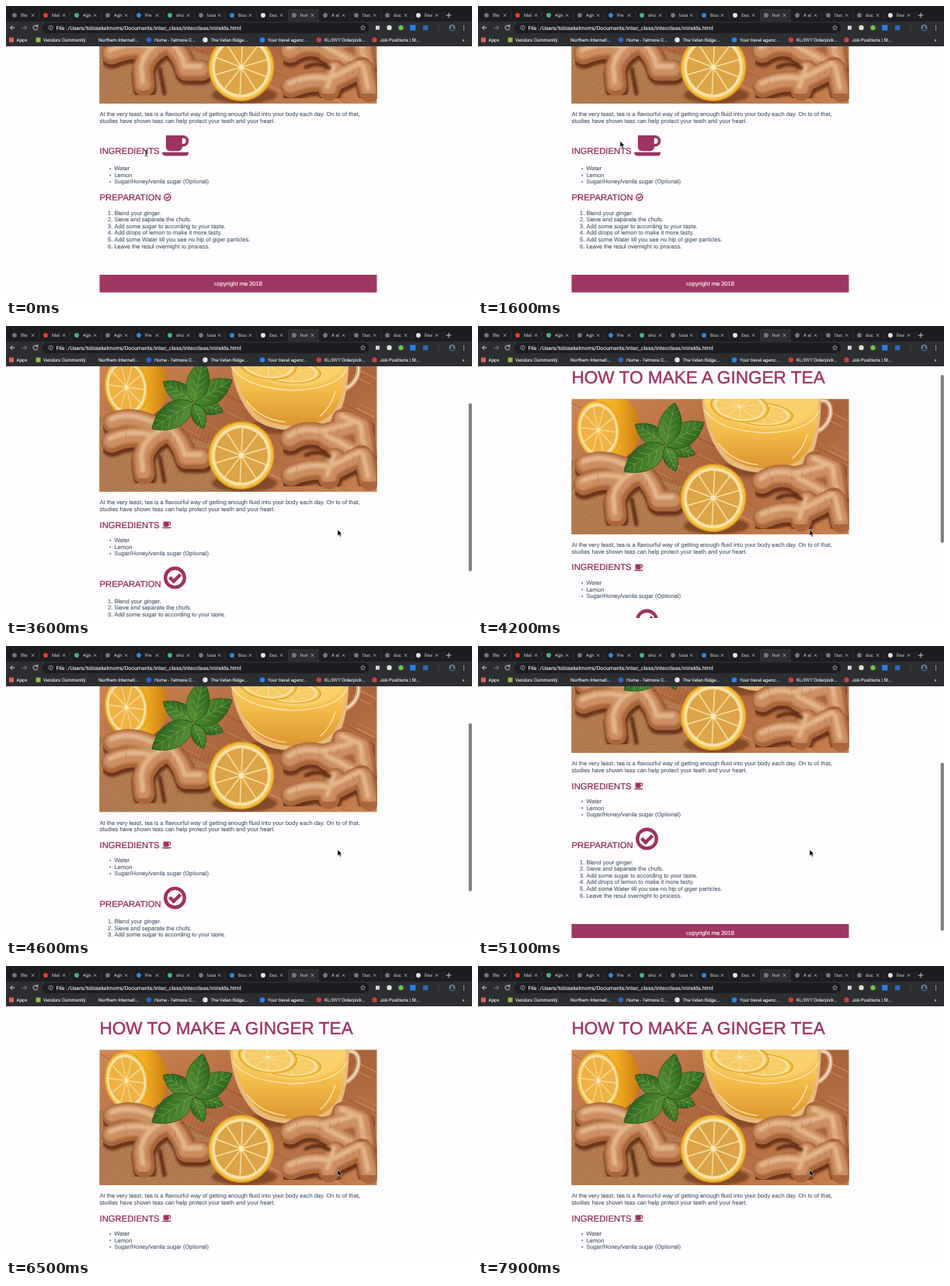
Write an HTML page that moves like this. It is 600 by 377 pixels and loops after 8000 ms.

```html
<!DOCTYPE html>
<html lang="en">
<head>
<meta charset="utf-8">
<title>Ginger tea</title>
<style>
  html, body { margin: 0; width: 100%; height: 100%; overflow: hidden; background: #fffdff; }
  svg { display: block; width: 600px; height: 377px; }
  text { text-rendering: geometricPrecision; white-space: pre; }
  .page text { font: 7.53px "Liberation Sans", Arial, sans-serif; fill: #4c5c6d; stroke: #4c5c6d; stroke-width: .12; }
  .page .h1 { font-size: 22.59px; fill: #9c3361; stroke: #9c3361; stroke-width: .4; }
  .page .h3 { font-size: 11.29px; fill: #8c2250; stroke: #8c2250; stroke-width: .2; }
  .page .foot { fill: #fff; stroke: #fff; text-anchor: middle; }
  .chrome text { font: 6px Roboto, sans-serif; fill: #eceef0; stroke: #eceef0; stroke-width: .12; }
  .chrome .tab { fill: #b4b7bc; stroke: #b4b7bc; }
  .chrome .url { font-size: 7px; }
  .line { fill: none; stroke-linecap: round; stroke-linejoin: round; }
</style>
</head>
<body>
<svg viewBox="0 0 600 377">
  <defs>
    <clipPath id="photoClip"><rect x="120.5" y="108.3" width="357" height="174.7"/></clipPath>
    <filter id="soft"><feGaussianBlur stdDeviation="1.8"/></filter>
    <linearGradient id="wood" x2="1" y2="1">
      <stop stop-color="#cf8856"/><stop offset=".5" stop-color="#a9633b"/><stop offset="1" stop-color="#c88253"/>
    </linearGradient>
    <linearGradient id="tea" x2="0" y2="1">
      <stop stop-color="#f8d66d"/><stop offset=".55" stop-color="#f1b744"/><stop offset="1" stop-color="#d9942f"/>
    </linearGradient>
    <linearGradient id="peel">
      <stop stop-color="#f6c33c"/><stop offset=".6" stop-color="#f2ad22"/><stop offset="1" stop-color="#c97a12"/>
    </linearGradient>
    <linearGradient id="leaf" x2="1" y2="1">
      <stop stop-color="#5f9a3a"/><stop offset="1" stop-color="#23591b"/>
    </linearGradient>
  </defs>
  <rect width="600" height="377" fill="#fffdff"/>
  <g class="page" id="page">
    <text class="h1" x="120.5" y="88">HOW TO MAKE A GINGER TEA</text>
    <g id="photo" clip-path="url(#photoClip)"></g>
    <text x="120.5" y="299.4">At the very least, tea is a flavourful way of getting enough fluid into your body each day. On to of that,</text>
    <text x="120.5" y="308">studies have shown teas can help protect your teeth and your heart.</text>
    <g id="ingredients">
      <text class="h3" x="120.5">INGREDIENTS</text>
      <g id="cup" fill="#9c3361">
        <path fill-rule="evenodd" d="M4.9-24.2H27a7.3 7.3 0 0 1 0 14.6h-1.2v.6a5 5 0 0 1-5 5H9.9a5 5 0 0 1-5-5zM25.8-20.6v7.3H27a3.6 3.6 0 0 0 0-7.3z"/>
        <path d="M0-2.4H34.3a4.8 4.8 0 0 1-4.8 4.8H4.8A4.8 4.8 0 0 1 0-2.4z"/>
      </g>
    </g>
    <g id="bullets"></g>
    <g id="preparation">
      <text class="h3" x="120.5">PREPARATION</text>
      <g id="check" class="line" stroke="#9c3361" stroke-width="4.4">
        <circle cx="14.5" cy="-12" r="12.3"/>
        <path stroke-linecap="butt" stroke-linejoin="miter" d="M7.6-12.6l5.2 5.2 8.9-8.9"/>
      </g>
    </g>
    <g id="steps"></g>
    <g id="footer">
      <rect x="120.5" width="357" height="22.8" fill="#9f3763"/>
      <text class="foot" x="299" y="13.6">copyright me 2018</text>
    </g>
  </g>
  <rect id="thumb" x="595.8" width="4" height="217" rx="2" fill="#7d7d7f"/>
  <g class="chrome" id="chrome"></g>
  <g id="cursor">
    <path id="arrow" d="M0 0v8l1.9-1.7 1.3 2.9 1.4-.6-1.3-2.8h2.5z" fill="#000" stroke="#fff" stroke-width=".5"/>
    <path id="beam" class="line" d="M-1.6-4Q0-4 0-2.6V2.6Q0 4-1.6 4M1.6-4Q0-4 0-2.6M0 2.6Q0 4 1.6 4M-1 1h2" stroke="#222" stroke-width=".8"/>
  </g>
</svg>
<script>
const el = id => document.getElementById(id);
const text = (x, y, label, cls = '') => `<text x="${x}" y="${y}" class="${cls}">${label}</text>`;
const rect = (x, y, w, h, fill, rx = 0) => `<rect x="${x}" y="${y}" width="${w}" height="${h}" fill="${fill}" rx="${rx}"/>`;
const dot = (x, y, r, fill) => `<circle cx="${x}" cy="${y}" r="${r}" fill="${fill}"/>`;
const line = (d, stroke, width = 1) => `<path class="line" d="${d}" stroke="${stroke}" stroke-width="${width}"/>`;
const blur = shapes => `<g filter="url(#soft)">${shapes}</g>`;

let seed = 11;
const random = () => (seed = seed * 16807 % 2147483647) / 2147483647;

function lemon(x, y, rx, ry, tilt, flesh) {
  let s = dot(0, 0, 1, '#dc9a22') + dot(0, 0, .96, '#f3c145') + dot(0, 0, .89, '#f7e2a6') + dot(0, 0, .8, flesh);
  for (let i = 0; i < 10; i++) {
    const a = i * Math.PI / 5 + .2;
    s += line(`M0 0L${Math.cos(a) * .8} ${Math.sin(a) * .8}`, '#f6dc97', .04);
  }
  return `<g transform="translate(${x} ${y}) rotate(${tilt}) scale(${rx} ${ry})">${s}${dot(0, 0, .08, '#f9e7b8')}</g>`;
}

function ginger(fingers, width) {
  const layer = (dx, dy, color, w) =>
    `<g transform="translate(${dx} ${dy})">${fingers.map(d => line(d, color, w)).join('')}</g>`;
  return blur(layer(1, 4, '#6a361b', width + 3)) + layer(0, 0, '#a9663c', width) +
    blur(layer(-1, -2, '#cb8f62', width * .7) + layer(-2, -5, '#e3b68c', width * .22));
}

function leaf(x, y, length, angle) {
  const w = length * .32;
  let veins = `M0 0H${length * .95}`;
  for (let i = 1; i < 5; i++) {
    const p = length * i * .18;
    veins += `M${p} 0l${w * .5} ${-w * .5}M${p} 0l${w * .5} ${w * .5}`;
  }
  return `<g transform="translate(${x} ${y}) rotate(${angle})">
    <path d="M0 0C${length * .2} ${-w * 1.2} ${length * .7} ${-w} ${length} 0C${length * .7} ${w} ${length * .2} ${w * 1.2} 0 0" fill="url(#leaf)" stroke="#1f4f19" stroke-width=".7"/>
    ${line(veins, '#83b25a', .5)}</g>`;
}

function drawPhoto() {
  let s = rect(120, 108, 358, 176, 'url(#wood)');
  for (let i = 0; i < 60; i++) {
    const x = 110 + random() * 370, y = 108 + random() * 170, n = 15 + random() * 50;
    s += line(`M${x} ${y}l${n} ${n * .5}`, random() < .5 ? '#8e482799' : '#dba06e99', .4 + random());
  }
  s += '<path d="M120 186L190 196 262 222 290 283H120z" fill="#ad764c"/>';
  for (let i = 0; i < 34; i++) s += line(`M${120 + i * 5} 192l-30 90M120 ${194 + i * 4}l150 30`, '#c99a6d66', .7);

  s += blur('<ellipse cx="178" cy="186" rx="36" ry="9" fill="#6f371c99"/>');
  s += '<ellipse cx="171" cy="146" rx="38" ry="43" fill="url(#peel)"/>' + lemon(155, 148, 28, 38, -8, '#efb344');

  // glass cup, slices and handle
  s += blur('<ellipse cx="374" cy="199" rx="66" ry="10" fill="#6f371c99"/>');
  s += line('M436 111C460 102 460 142 435 151', '#d3a580', 6) + line('M437 111C460 103 460 141 436 150', '#f3e0cd', 2);
  s += '<path d="M288 104Q291 157 318 187Q334 203 372 204Q413 204 428 183Q441 162 442 104z" fill="#e8bb7c"/>';
  s += '<path d="M291 108Q296 153 321 181Q337 197 372 198Q407 198 423 178Q437 156 438 108z" fill="url(#tea)"/>';
  s += blur('<path d="M294 108H436Q434 143 380 147Q318 147 294 108z" fill="#f8d16a"/>');
  s += lemon(366, 128, 40, 15, 4, '#f6cb62') + lemon(337, 118, 38, 20, 8, '#f6cb62');
  s += line('M291 122Q308 149 370 152Q427 150 439 124', '#fbe7b0', 1.3);
  s += line('M310 166Q328 190 360 193', '#f8dc98', 1.4) + line('M424 154Q418 174 405 185', '#fbe4b0', 1.4);

  s += ginger(['M138 194Q160 184 188 197L214 206', 'M136 219Q160 208 186 214', 'M204 207Q180 218 176 240L178 260', 'M214 208Q228 222 232 240L252 240'], 27);
  s += ginger(['M366 216Q384 203 408 210L446 200', 'M434 190L458 200 464 236', 'M414 215L446 232'], 29);
  s += ginger(['M367 262Q392 250 418 256L458 236', 'M462 240L468 268', 'M424 240L416 266'], 27);
  s += blur(line('M386 236Q402 228 416 237', '#5f2f18', 5) + line('M198 238L204 270', '#5f2f18', 5));
  for (let i = 0; i < 26; i++) {
    const right = i > 11, x = right ? 365 + random() * 95 : 143 + random() * 80, y = 198 + random() * 58;
    s += line(`M${x} ${y}q4 4 ${2 - random() * 4} 9`, '#8a512f66', .8);
  }

  s += leaf(242, 166, 40, 20) + leaf(242, 168, 57, -31) + leaf(241, 166, 46, -147);
  s += leaf(240, 168, 62, 147) + leaf(242, 167, 55, -78) + leaf(242, 170, 34, 68);
  s += blur('<ellipse cx="307" cy="272" rx="42" ry="11" fill="#5f2d1799"/>') + lemon(303, 236, 42.5, 44, 9, '#dba548');
  el('photo').innerHTML = s;
}

function drawLists() {
  el('bullets').innerHTML = ['Water', 'Lemon', 'Sugar/Honey/vanila sugar (Optional)']
    .map((item, i) => dot(134.2, i * 8.6 - 2.3, .95, '#4c5c6d') + text(139.4, i * 8.6, item)).join('');
  el('steps').innerHTML = ['Blend your ginger.', 'Sieve and separate the chufs.', 'Add some sugar to according to your taste.',
    'Add drops of lemon to make it more tasty.', 'Add some Water till you see no hip of giger particles.', 'Leave the resul overnight to process.']
    .map((item, i) => text(131, i * 8.55, i + 1 + '.') + text(139.4, i * 8.55, item)).join('');
}

function drawChrome() {
  const tabs = ['file:', 'Mai', 'Agn', 'Agn', 'Fre', 'sho', 'loca', 'Boo', 'Doc', 'hov', 'A si', 'Doc', 'doc', 'Res'];
  const tabColors = { 1: '#f03a32', 2: '#41b883', 4: '#2b8de0', 5: '#41b883', 7: '#2b8de0', 8: '#f1f1f1', 13: '#e3e3e3' };
  const bar = '#2d2e32';
  let s = rect(0, 0, 600, 22, '#1c1d20') + rect(0, 20, 600, 32, bar);
  s += `<path d="M360 20.5Q363 20 363 17V7Q363 4 366 4H400Q403 4 403 7V17Q403 20 406 20.5z" fill="${bar}"/>`;
  tabs.forEach((name, i) => {
    const x = 11 + i * 40;
    s += dot(x, 12, 2.9, tabColors[i] || '#74777c') + text(x + 8, 14.2, name, 'tab');
    s += line(`M${x + 22} 10.4l3.2 3.2m0-3.2l-3.2 3.2`, '#c6c8cc', .7);
    if (i != 8 && i != 9) s += line(`M${x + 31.5} 8v8`, '#4a4c50', .5);
  });
  s += line('M567 12h6M570 9v6', '#d5d7da', .9);

  s += rect(47, 21.5, 420, 13.5, '#1c1d20', 6.7);
  s += line('M11 28H5.5m2.6-2.6L5.5 28l2.6 2.6', '#e3e5e8', .9) + line('M21 28h5.5m-2.6-2.6l2.6 2.6-2.6 2.6', '#85888d', .9);
  s += line('M40.6 26.2a3 3 0 1 0 .4 2.6M41 24.6v2.1h-2.1', '#e3e5e8', .9);
  s += `<circle cx="57.5" cy="28" r="2.7" fill="none" stroke="#bfc2c6" stroke-width=".7"/>` + line('M57.5 27.8v1.4M57.5 26.6v.1', '#bfc2c6', .7);
  s += text(64.5, 30.5, 'File', 'url') + line('M77.7 25v6', '#606368', .5);
  s += text(79.5, 30.5, '/Users/tobiaskelmorra/Documents/intec_class/intecclass/mirelda.html', 'url');
  s += line('M459.5 25l.9 2 2.2.2-1.7 1.5.5 2.2-1.9-1.2-1.9 1.2.5-2.2-1.7-1.5 2.2-.2z', '#c8cace', .6);
  s += rect(476, 25.5, 5, 5, '#d8d8d8') + dot(493.5, 28, 3.2, '#dfe6d5') + dot(508.5, 28, 3.2, '#6fc04c');
  s += rect(520, 24.5, 7.5, 7, '#2e7be0') + rect(537, 25, 6.5, 6, '#2c66c4') + line('M557 24v8', '#5d6065', .6);
  s += dot(574.5, 28, 4, '#5c7ca3') + dot(574.5, 27, 1.5, '#2f3035') + '<path d="M571.7 30.7a2.8 2.8 0 0 1 5.6 0z" fill="#2f3035"/>';
  [25.5, 28, 30.5].forEach(y => s += dot(589.5, y, .7, '#e3e5e8'));

  [
    [13.5, 'Apps', '#e26656'], [48, 'Vendoro Community', '#95bf47'], [119, 'Northern Internati...'],
    [191, 'Home - Talmore C...', '#2f63c9'], [263.5, 'The Velan Ridge...', '#e4e4e4'], [337, 'Your travel agenc...', '#2f86e8'],
    [410, 'KL/DVT Orderpick...', '#c8433d'], [481.5, 'Job Positions | St...', '#c8433d'], [587.5, '»']
  ].forEach(([x, label, color], i) => {
    if (color) s += i < 2 ? rect(x - 9.5, 40.7, 6, 6, color, .8) : dot(x - 7, 43.7, 3.2, color);
    s += text(x, 45.8, label);
  });
  el('chrome').innerHTML = s;
}

const clamp = v => Math.max(0, Math.min(1, v));
function tween(t, keys) {
  const next = keys.findIndex(k => k[0] > t);
  if (next < 0) return keys[keys.length - 1][1];
  const [t0, a] = keys[next - 1], [t1, b] = keys[next], p = (t - t0) / (t1 - t0);
  return a + (b - a) * p * p * (3 - 2 * p);
}

const scrollKeys = [[0, 157], [1950, 157], [1950, 136], [2700, 136], [3100, 111], [4200, 14], [5100, 145], [5250, 145], [5950, 0]];
const cursorX = [[0, 180.5], [1200, 180.5], [1500, 183], [1700, 183], [2350, 427]];
const cursorY = [[0, 190], [1200, 190], [1500, 174.5], [1700, 174.5], [2350, 263]];
const place = (id, x, y, scale = 1) => el(id).setAttribute('transform', `translate(${x} ${y}) scale(${scale})`);

function render(t) {
  const cupHover = t < 1950, checkHover = t >= 2900;
  const scroll = tween(t, scrollKeys);
  const grow = cupHover || checkHover ? 21 : 0;
  place('page', 0, -scroll);
  place('ingredients', 0, cupHover ? 348.2 : 329.5);
  place('cup', 201, 0, cupHover ? 1 : 1 / 3);
  place('bullets', 0, cupHover ? 369.2 : 348);
  place('preparation', 0, checkHover ? 406 : 387 + grow);
  place('check', 203, 0, checkHover ? 1 : 1 / 3);
  place('steps', 0, 405.8 + grow);
  place('footer', 0, 483 + grow);

  place('thumb', 0, 53.5 + scroll * .67);
  el('thumb').setAttribute('opacity', t < 2700 ? 0 : clamp((6300 - t) / 200));
  place('cursor', tween(t, cursorX), tween(t, cursorY));
  el('beam').setAttribute('opacity', t < 1350 ? 1 : 0);
  el('arrow').setAttribute('opacity', t < 1350 ? 0 : 1);
}

drawPhoto();
drawLists();
drawChrome();
const start = performance.now();
(function frame() {
  render((performance.now() - start) % 8000);
  requestAnimationFrame(frame);
})();
</script>
</body>
</html>
```
